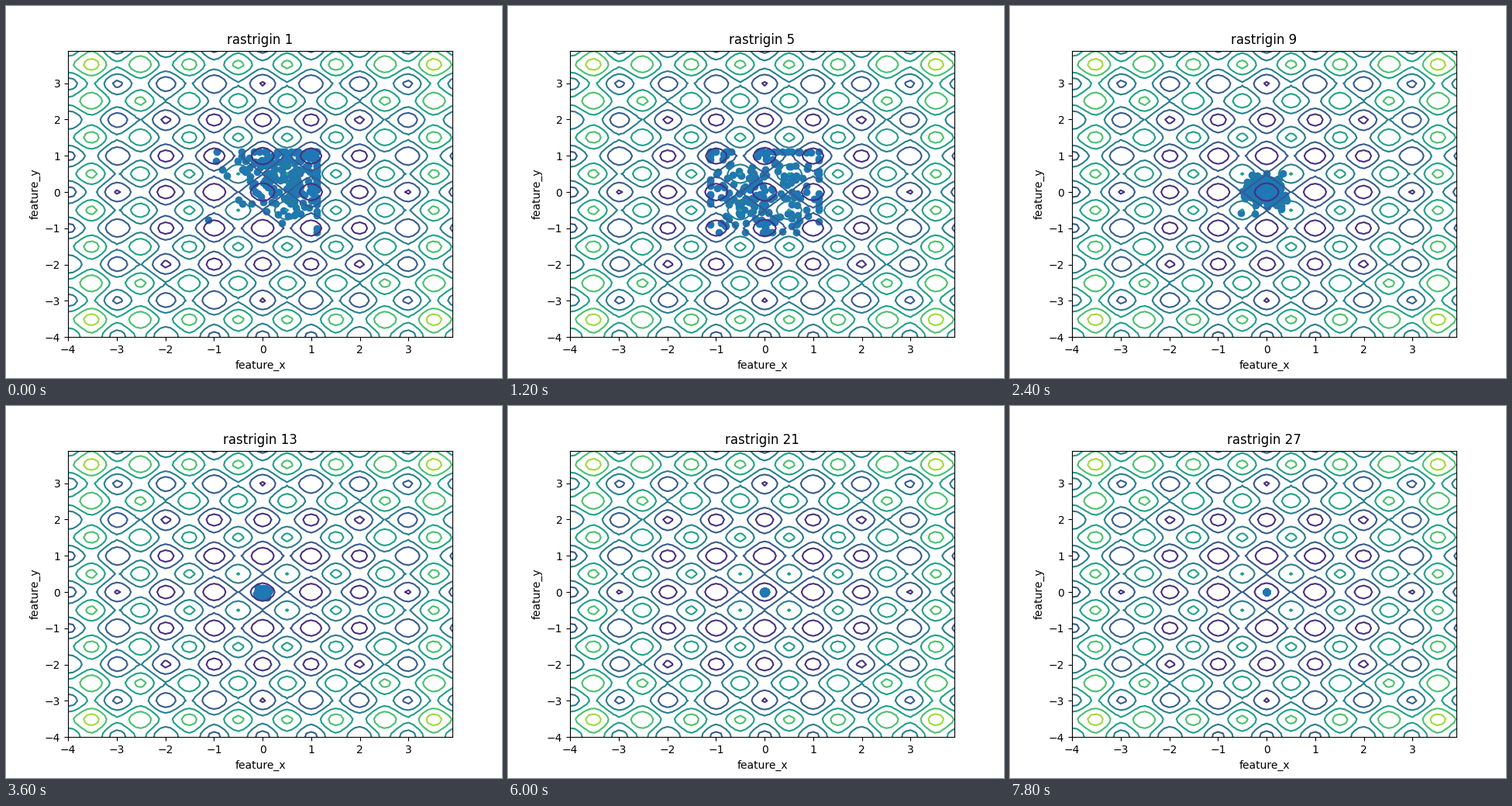
These frames come from a looping animation (640x480 px, 8000 ms). A matplotlib script:

```python
import numpy as np
import matplotlib.pyplot as plt
from matplotlib.animation import FuncAnimation

STEP_MS, TICK_MS, LOOP_MS = 300, 100, 8000
BOUND = 1.12
COUNT = 200

# The swarm drifts between the walls, then closes in on the minimum.
KEY_STEPS = [1, 3, 5, 9, 13, 21, 27]
CENTER_X = [0.65, -0.15, 0, 0, 0, 0, 0]
CENTER_Y = [0.45, -0.6, 0.1, 0, 0, 0, 0]
SPREAD = [0.65, 0.95, 0.75, 0.2, 0.047, 0.012, 0.0015]


def rastrigin(x, y):
    return 20 + sum(v**2 - 10 * np.cos(2 * np.pi * v) for v in (x, y))


def swarm(step):
    """Normal cloud whose members stop at the walls of the search box."""
    rng = np.random.default_rng(step)
    center = [np.interp(step, KEY_STEPS, c) for c in (CENTER_X, CENTER_Y)]
    spread = np.exp(np.interp(step, KEY_STEPS, np.log(SPREAD)))
    return np.clip(rng.normal(center, spread, (COUNT, 2)), -BOUND, BOUND)


fig, ax = plt.subplots(figsize=(6.4, 4.8), dpi=100)
grid = np.arange(-4, 4, 0.1)
gx, gy = np.meshgrid(grid, grid)
# The tiny offset keeps minima that lie exactly on a level from showing specks.
ax.contour(gx, gy, rastrigin(gx, gy) + 1e-9)
dots = ax.scatter(*swarm(1).T, color="tab:blue")
ax.set(xlim=(grid[0], grid[-1]), ylim=(grid[0], grid[-1]),
       xlabel="feature_x", ylabel="feature_y")
title = ax.set_title("rastrigin 1")


def update(tick):
    step = tick * TICK_MS // STEP_MS + 1
    dots.set_offsets(swarm(step))
    title.set_text(f"rastrigin {step}")
    return dots, title


anim = FuncAnimation(fig, update, frames=LOOP_MS // TICK_MS,
                     interval=TICK_MS, repeat=True, repeat_delay=0)
plt.show()
```
